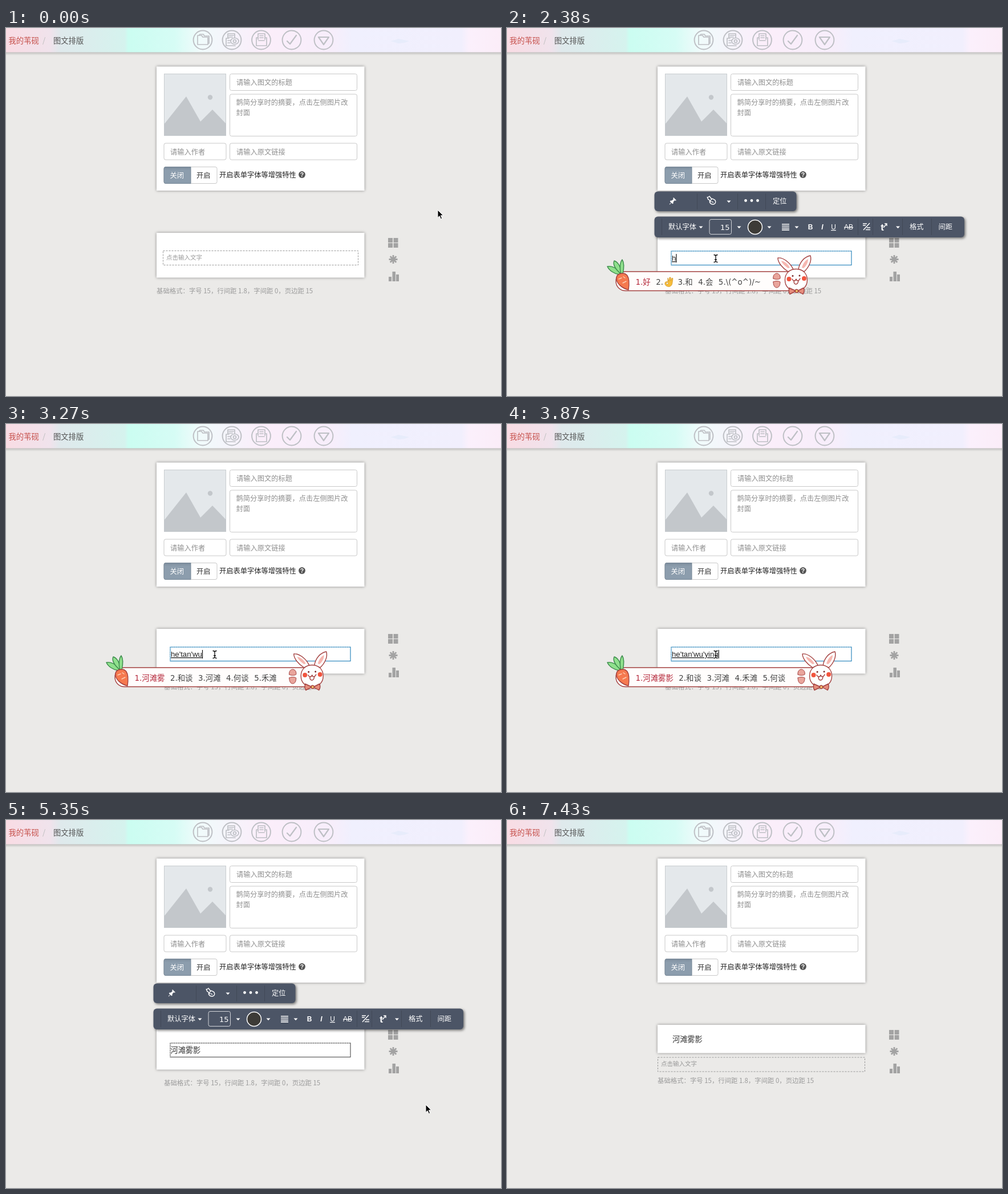
Recreate the animation shown at these times as an HTML page. Size 868 by 645 pixels, loop 7730 ms.

```html
<!DOCTYPE html>
<html lang="zh-CN">
<head>
<meta charset="utf-8">
<title>图文排版</title>
<style>
html, body { margin: 0; width: 100%; height: 100%; overflow: hidden; background: #ebeae8; }
svg { display: block; width: 868px; height: 645px; font: 12.25px "Noto Sans CJK SC", "Noto Sans", sans-serif; }
text { white-space: pre; }
.card { fill: #fff; filter: drop-shadow(0 0 2.5px rgba(0,0,0,.42)); }
.field { fill: #fff; stroke: #c9c9c9; }
.hint { fill: #8f8f8f; }
.ring { fill: none; stroke: #bec0c5; stroke-width: 2; }
.mark { fill: none; stroke: #bec0c5; stroke-width: 1.7; stroke-linejoin: round; stroke-linecap: round; }
.bar { fill: #4c5566; filter: drop-shadow(2px 2px 2px rgba(0,0,0,.5)); }
.sep { stroke: #414957; fill: none; }
.tool { fill: #fff; }
.line { stroke: #fff; fill: none; }
.latin { font-family: "Liberation Sans", Arial, sans-serif; }
.ink { stroke: #a3403f; stroke-width: 1.4; stroke-linejoin: round; stroke-linecap: round; }
#pinyin { font-size: 13.2px; text-decoration: underline; }
#list { font: 13.4px "DejaVu Sans", "Noto Sans CJK SC", sans-serif; fill: #444; }
</style>
</head>
<body>
<svg viewBox="0 0 868 645">
  <defs>
    <linearGradient id="sky">
      <stop offset="0" stop-color="#f9dce4"/><stop offset=".09" stop-color="#f0e3ec"/>
      <stop offset=".11" stop-color="#dfe9ec"/><stop offset=".24" stop-color="#d5f3ee"/>
      <stop offset=".247" stop-color="#cbfdf1"/><stop offset=".34" stop-color="#d6fcf5"/>
      <stop offset=".39" stop-color="#f0fbfb"/><stop offset=".46" stop-color="#f6f3fb"/>
      <stop offset=".52" stop-color="#fbeefa"/><stop offset=".66" stop-color="#f7eefb"/>
      <stop offset=".7" stop-color="#f0f0fe"/><stop offset=".92" stop-color="#f1effd"/>
      <stop offset=".935" stop-color="#fbf0fc"/><stop offset="1" stop-color="#fbedf8"/>
    </linearGradient>
    <linearGradient id="fade" x2="0" y2="1">
      <stop stop-color="#000" stop-opacity=".2"/><stop offset="1" stop-color="#000" stop-opacity="0"/>
    </linearGradient>
    <linearGradient id="press" x2="0" y2="1">
      <stop stop-color="#7c8c9c"/><stop offset=".2" stop-color="#8c9dad"/>
    </linearGradient>
  </defs>
  <rect width="868" height="645" fill="#ebeae8"/>

  <rect y="42" width="868" height="6" fill="url(#fade)"/>
  <rect width="868" height="42.5" fill="url(#sky)"/>
  <path d="M674 23l8-2 6-2 10 2 9 2-9 3-10 1-6-2z" fill="#e7ecfb"/>
  <g font-size="13.3">
    <text x="4.5" y="27" fill="#c6504b">我的苇砚</text>
    <text x="64" y="27" fill="#bbb">/</text>
    <text x="83" y="27" fill="#555">图文排版</text>
  </g>
  <g id="rings"></g>
  <g class="mark">
    <path d="M336 29V13h7l2 3h9v13zM338 13l2-2h6l2 3h8v13h-2"/>
    <path d="M389 18V10h12v7M386 18h5M386 18v13h16M391 13h8M391 16h6M389 22h5M389 26h4"/>
    <ellipse cx="401" cy="23" rx="7" ry="5.5"/><circle cx="401" cy="23" r="2.5"/>
    <path d="M442 20V10h12v10M439 17h3M454 17h3v14h-18V17M445 13.500h6M445 17h6M443 22h10"/>
    <path d="M493 23l5 5 11-15" stroke-width="2.2"/>
    <path d="M548 16h18l-9 13z" stroke-width="2.2"/>
  </g>

  <rect class="card" x="264" y="67.500" width="364.500" height="217.500"/>
  <rect x="277.500" y="80.500" width="108" height="108" fill="#e4e8eb" stroke="#c8cdd0"/>
  <path d="M277 169L316 120 341 164 362 143 386 168V189H277z" fill="#c3c7cb"/>
  <circle cx="358" cy="121.500" r="4.200" fill="#c3c7cb"/>
  <g class="field">
    <rect x="392.500" y="80.500" width="223" height="29" rx="3"/>
    <rect x="392.500" y="116" width="223" height="73.500" rx="3"/>
    <rect x="277" y="202" width="109" height="29" rx="3"/>
    <rect x="392.500" y="202" width="223" height="29" rx="3"/>
    <rect x="277" y="243.500" width="93" height="29" rx="3"/>
  </g>
  <path d="M324 243.500V272.500H280a3 3 0 0 1-3-3V246.500a3 3 0 0 1 3-3z" fill="url(#press)" stroke="#778797"/>
  <g class="hint">
    <text x="404" y="100">请输入图文的标题</text>
    <text x="403.500" y="135">鹊简分享时的摘要，点击左侧图片改</text>
    <text x="403.500" y="152.500">封面</text>
    <text x="288" y="221.500">请输入作者</text>
    <text x="404" y="221.500">请输入原文链接</text>
  </g>
  <text x="287.500" y="262.500" fill="#fff">关闭</text>
  <text x="334" y="262.500" fill="#333">开启</text>
  <text x="374" y="262" fill="#222">开启表单字体等增强特性</text>
  <circle cx="519" cy="257" r="5.900" fill="#555"/>
  <text class="latin" x="519" y="260.800" font-size="10.500" font-weight="bold" text-anchor="middle" fill="#fff">?</text>

  <rect class="card" id="page" x="264" y="359" width="364.500"/>
  <g fill="#a3a3a3">
    <path d="M670 368h8v8h-8zM679.500 368h8v8h-8zM670 377h8v8h-8zM679.500 377h8v8h-8z"/>
    <path d="M671 436h5v8h-5zM677.500 427h5.500v17h-5.500zM684 432h5v12h-5z"/>
    <path d="M679 398v15M671.500 405.500h15M673.700 400.200l10.600 10.600M684.300 400.200l-10.600 10.600" stroke="#a3a3a3" stroke-width="2.800"/>
  </g>
  <text id="format" font-size="11.400" fill="#9b9b9b">基础格式：字号 15，行间距 1.8，字间距 0，页边距 15</text>
  <rect id="slot" height="25" fill="none"/>
  <text id="hint" font-size="10.500">点击输入文字</text>
  <g id="box">
    <rect id="edge" x="288" y="391" width="316" height="24.500" fill="#fff" stroke-width="1.200"/>
    <path id="dots" d="M288 415V391H604" fill="none" stroke="#fff" stroke-width="1.200" stroke-dasharray="2 2"/>
  </g>
  <text id="pinyin" class="latin" x="289" y="408" fill="#222">h</text>
  <text id="done" font-size="13.200" fill="#333">河滩雾影</text>
  <rect id="caret" y="396" width="1.200" height="15" fill="#111"/>

  <g id="bar1">
    <rect class="bar" x="258.500" y="286.500" width="249" height="34.500" rx="6"/>
    <path class="sep" d="M333.500 290v28M404.500 290v28M453.500 290v28"/>
    <path class="tool" d="M292 297l5 5-1.500.8-1.300-.7-2.700 2.800.2 2.400-1.500 1-2-2.100-2.700 3h-.7v-.6l3-2.700-2.100-2 1-1.500 2.400.2 2.800-2.700-.7-1.300z"/>
    <path class="line" stroke-width="1.400" d="M352 297l3-2 4 5M353 300l5 5M356 303c-2 2 1 6 5 6 5 0 6-5 3-8l-4-2zM359 304l3 2M351 296l2 5"/>
    <g class="tool"><circle cx="418.500" cy="302.500" r="2.400"/><circle cx="429" cy="302.500" r="2.400"/><circle cx="439.500" cy="302.500" r="2.400"/></g>
    <text class="tool" x="466" y="308">定位</text>
  </g>
  <g id="bar2">
    <rect class="bar" x="258.500" y="330.500" width="543.500" height="36.500" rx="6"/>
    <path class="sep" d="M271.500 334v29M615.500 334v29M641.500 334v29M693.500 334v29M744.500 334v29"/>
    <rect class="line" x="355" y="335.500" width="38.500" height="26" rx="3" stroke-opacity=".75"/>
    <circle cx="435" cy="349" r="12.500" fill="#3d3b37" stroke="#fff" stroke-width="1.500"/>
    <path class="line" stroke-width="1.600" d="M482 344h13M482 347.300h13M482 350.600h13M482 353.900h13"/>
    <g class="tool">
      <text x="283" y="353">默认字体</text>
      <text x="374" y="353.500" font-size="13" font-family="DejaVu Sans, sans-serif">15</text>
      <text x="706" y="353">格式</text>
      <text x="756.500" y="353">间距</text>
      <g class="latin" font-size="12" text-anchor="middle">
        <text x="532" y="353" font-weight="bold">B</text>
        <text x="553" y="353" font-style="italic" font-weight="bold">I</text>
        <text x="572.500" y="353" text-decoration="underline">U</text>
        <text x="599" y="353" text-decoration="line-through">AB</text>
        <text x="658" y="355" font-size="17" font-weight="bold">t</text>
      </g>
    </g>
    <path class="line" stroke-width="1.400" d="M624 343h7M624 346h5M636 342l-11 12M631 350h6M629 353.500h8M660 350l6-7M662 343h4v4"/>
  </g>

  <g id="ime">
    <rect id="strip" class="ink" x="191" y="427" height="33.500" rx="16.500" fill="#fffdfc"/>
    <g class="ink">
      <g fill="#8fe08c" stroke="#3c8a4c">
        <path d="M197 432c-9-1-18-7-21-14 9-2 18 4 22 12z"/>
        <path d="M199 430c-9-7-14-16-11-22 7 2 12 12 13 21z"/>
        <path d="M200 431c-3-10-2-20 2-25 4 6 3 16 1 25z"/>
      </g>
      <path d="M192 437c1-7 14-10 19-3 4 6 3 18 2 25-9-2-23-11-21-22z" fill="#f5794f"/>
      <path d="M196 440l5-2M203 447l6-3M204 436l3 2" stroke="#fbd0b5"/>
    </g>
    <g id="list"></g>
    <g id="thumb" transform="translate(277 437)" fill="#f7bd3a" stroke="#c98b1f" stroke-width=".7">
      <path d="M5 1l2 6 1-7 2 .2.200 6 2-5 1.700.6-1 8c-.5 5-4 7-7 6.500-4-.5-6-3-6-5.500 0-3 3-4 5-2.500z"/>
      <circle cx="4" cy="10.500" r="1.700" fill="#fff"/>
    </g>
    <g id="rabbit" class="ink">
      <g fill="#e9a59c" stroke-width="1">
        <path d="M-40 439c-1-6 3-9 6-9s7 3 6 9c-3 2-9 2-12 0z"/>
        <path d="M-40 445c3-2 9-2 12 0 0 6-2 10-6 10s-6-4-6-10z"/>
      </g>
      <g fill="#fff">
        <path d="M-14 427c-10-6-18-16-18-24 10-1 22 9 27 20z"/>
        <path d="M4 423c2-12 10-22 21-24 3 9-3 21-11 28z"/>
        <path d="M-14 421c-6-4-11-9-12-13 6 1 11 5 15 12zM10 420c2-7 6-13 11-15 0 6-3 12-8 16z" fill="#f6b7b0" stroke="none"/>
        <path d="M0 422.500c12 0 19.500 8 19.500 19 0 12-8 19-19.500 19s-19.500-7-19.500-19c0-11 7.500-19 19.500-19z"/>
      </g>
      <g fill="#f2553f" stroke="none"><circle cx="-12.500" cy="440" r="4"/><circle cx="14" cy="439" r="4"/></g>
      <g fill="#7a2a2a" stroke="none"><circle cx="-6" cy="434.500" r="1.500"/><circle cx="6" cy="434" r="1.500"/></g>
      <path d="M-7 440c2 4 6 4 7 0 1 4 5 4 7-1M-4 443c0 8 7 8 8 0" fill="none"/>
      <path d="M0 461l-12-5.500c-1 4-1 8 1 11zM2 461l11-5.500c2 4 1 8-1 11z" fill="#e58d7d"/>
      <circle cx="1" cy="461" r="2.700" fill="#f4c36b"/>
    </g>
  </g>

  <path id="arrow" d="M0 0V13.500L3.200 10.600 5.400 15.700 7.600 14.800 5.500 9.700H9.800z" fill="#000" stroke="#fff" stroke-width="1"/>
  <g id="beam" fill="none">
    <path d="M-3.500-6.500q3 0 3.500 2 .5-2 3.500-2M-3.500 6.500q3 0 3.500-2 .5 2 3.500 2M0-5V5M-2 2H2" stroke="#fff" stroke-width="3"/>
    <path d="M-3.500-6.500q3 0 3.500 2 .5-2 3.500-2M-3.500 6.500q3 0 3.500-2 .5 2 3.500 2M0-5V5M-2 2H2" stroke="#111" stroke-width="1.300"/>
  </g>
</svg>
<script>
const LOOP = 7730;
const NS = "http://www.w3.org/2000/svg";
const $ = id => document.getElementById(id);
const set = (node, attrs) => { for (const k in attrs) node.setAttribute(k, attrs[k]); };
const show = (id, on) => set($(id), { visibility: on ? "visible" : "hidden" });
const add = (parent, tag, attrs) => {
  const node = parent.appendChild(document.createElementNS(NS, tag));
  set(node, attrs);
  return node;
};

for (const cx of [345, 396, 447.5, 501, 557])
  add($("rings"), "circle", { class: "ring", cx, cy: 21, r: 16.4 });
const drop = (bar, y, xs) => xs.forEach(x =>
  add($(bar), "path", { class: "tool", d: `M${x - 3.5} ${y}h7l-3.500 3.800z` }));
drop("bar1", 302.5, [389]);
drop("bar2", 347.5, [340, 407, 460, 508, 685.5]);

const at = (x, y, pointer = "arrow") => ({ x, y, pointer });
const type = (pinyin, words) => ({ pinyin, words, bars: 0 });

// Each step: start time in ms and what changes then.
const steps = [
  [0, { ...at(757, 319), pad: 0, bars: 0, bar1: 0, caret: 0, pinyin: "", words: "", hover: 0, mode: "idle" }],
  [440, at(738, 327)],
  [590, at(604, 364)],
  [740, { ...at(432, 398, "beam"), hover: 1 }],
  [890, at(366, 404, "beam")],
  [1030, { caret: 1 }],
  [1180, { mode: "edit", pad: 7, bars: .5 }],
  [1330, { pad: 13, bars: 1 }],
  [1780, { caret: 0 }],
  [2230, { caret: 1 }],
  [2380, { pinyin: "h", words: "好 \u2003\u2009 和 会 \\(^o^)/~" }],
  [2530, type("he", "和 喝 河 何 合")],
  [2680, type("he't", "和她 核桃 合同 和他 het")],
  [2830, type("he'ta", "和他 和她 和它 喝他 合他")],
  [2980, type("he'tan", "河滩 和谈 何谈 禾滩 合谈")],
  [3120, type("he'tan'w", "河滩外 和谈 河滩 何谈 禾滩")],
  [3270, type("he'tan'wu", "河滩雾 和谈 河滩 何谈 禾滩")],
  [3420, type("he'tan'wu'y", "河滩雾雨 河滩雾 河滩无 河滩屋 和谈")],
  [3570, type("he'tan'wu'yin", "河滩雾音 和谈 河滩 禾滩 何谈")],
  [3870, type("he'tan'wu'ying", "河滩雾影 和谈 河滩 禾滩 何谈")],
  [4020, { pinyin: "", words: "", mode: "typed" }],
  [4460, { ...at(374, 407, "beam"), caret: 0 }],
  [4610, { ...at(430, 426), hover: 0, bars: 1 }],
  [4760, at(536, 462)],
  [4910, { ...at(648, 497), caret: 1 }],
  [5050, at(716, 517)],
  [5200, at(737, 510)],
  [5350, { ...at(736, 499), caret: 0 }],
  [5490, { mode: "saved", bars: 0, bar1: .5 }],
  [5640, { pad: 8, bar1: .2 }],
  [5790, { pad: 3, bar1: 0 }],
  [5940, { pad: 0 }],
  [7130, at(762, 538)],
  [7280, at(817, 617)],
  [7430, { pointer: "" }]
];

function drawWords(words) {
  show("ime", words);
  show("thumb", words.includes("\u2003"));
  const list = $("list");
  list.textContent = "";
  if (!words) return;
  let x = 225.500, end = x;
  words.split(" ").forEach((word, i) => {
    const item = add(list, "text", { x, y: 450, fill: i ? "#444" : "#b5283a" });
    item.textContent = i + 1 + "." + word;
    end = x + item.getComputedTextLength();
    x = end + 9.5;
  });
  const mid = end + 62;
  set($("rabbit"), { transform: `translate(${mid} 0)` });
  set($("strip"), { width: mid - 181 });
}

function draw(s) {
  const idle = s.mode == "idle", saved = s.mode == "saved", typed = s.mode == "typed";
  const [x, y, w] = saved ? [264.5, 416, 363] : [275.5, 390.5, 342];
  set($("page"), { height: saved ? 49.5 : 78.5 });
  set($("format"), { x: 264 + s.pad, y: saved ? 461.3 : 465.2 });
  show("slot", idle || saved);
  set($("slot"), {
    x: x + s.pad, y, width: w - 2 * s.pad,
    stroke: s.hover ? "#45aee0" : "#999", "stroke-dasharray": s.hover ? "4 1" : "3 2"
  });
  show("hint", idle || saved);
  set($("hint"), { x: x + 5.5 + s.pad, y: y + 15, fill: s.hover ? "#666" : "#999" });

  show("box", !idle && !saved);
  set($("edge"), {
    x: 275 + s.pad, width: 342 - 2 * s.pad, stroke: s.hover ? "#2f88bd" : "#5c5c5c"
  });
  set($("dots"), { d: `M${275 + s.pad} 415V391H${617 - s.pad}`, opacity: s.hover ? .4 : .7 });
  show("pinyin", s.pinyin);
  $("pinyin").textContent = s.pinyin;
  show("done", typed || saved);
  set($("done"), saved ? { x: 290, y: 388.5 } : { x: 288.5, y: 408 });
  show("caret", s.caret);
  const typedWidth = s.pinyin ? $("pinyin").getComputedTextLength() : typed ? 53 : 0;
  set($("caret"), { x: (idle ? 276 : 276 + s.pad) + typedWidth });

  set($("bar1"), { opacity: s.bars || s.bar1 });
  set($("bar2"), { opacity: s.bars });
  drawWords(s.words);
  for (const id of ["arrow", "beam"]) {
    show(id, s.pointer == id);
    set($(id), { transform: `translate(${s.x} ${s.y})` });
  }
}

let last = -1;
function tick() {
  const t = performance.now() % LOOP;
  const now = steps.filter(([start]) => start <= t);
  if (now.length != last) {
    last = now.length;
    draw(Object.assign({}, ...now.map(step => step[1])));
  }
  requestAnimationFrame(tick);
}
tick();
</script>
</body>
</html>
```
